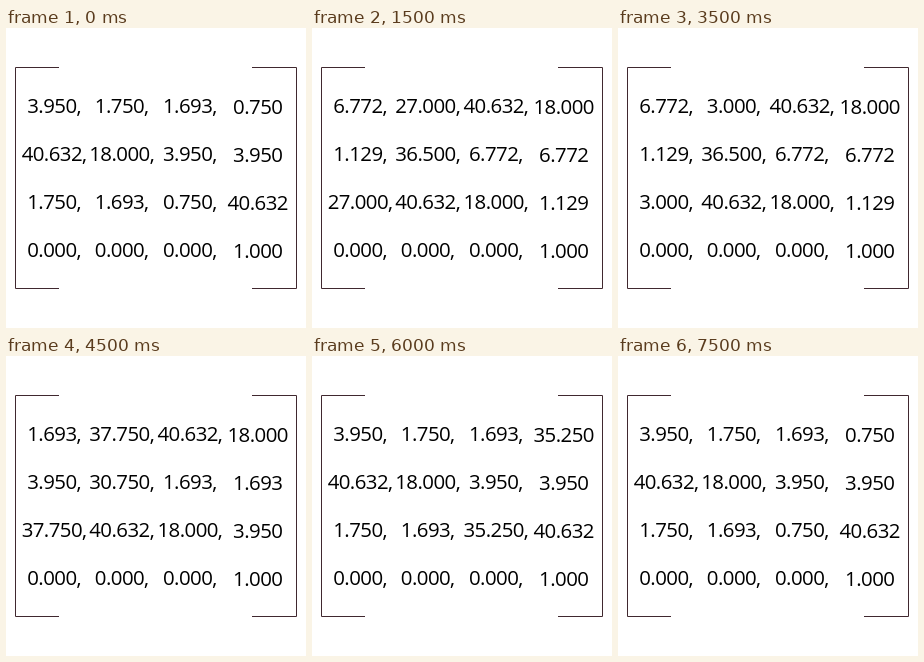
Animation, 300 px wide and 300 px high, one loop 8 s. Source, as an HTML page:

```html
<!DOCTYPE html>
<html lang="en">
<head>
<meta charset="utf-8">
<title>Matrix</title>
<style>
  html, body { margin: 0; width: 100%; height: 100%; overflow: hidden; background: #fff; }
  svg { display: block; width: 100%; height: 100%; }
  text {
    font: 20.4px "Open Sans", "Noto Sans", sans-serif;
    letter-spacing: -0.55px;
    text-anchor: middle;
    fill: #000;
  }
  path { fill: none; stroke: #40282f; stroke-width: 1; }
</style>
</head>
<body>
<svg viewBox="0 0 300 300">
  <path d="M53 39.5H9.5V260.5H53M246 39.5H290.5V260.5H246"/>
  <g id="cells"></g>
</svg>
<script>
const STEP = 500;
const COLS = [48.1, 115.7, 183.9, 251.7];
const UNIT = 40.632 / 72;

// a, c and e count whole units; b, d and f are plain values
const state = (a, b, c, d, e, f) => ({ a: a * UNIT, b, c: c * UNIT, d, e: e * UNIT, f });
const home = (b, d) => state(7, b, 3, d, 72, 18);

const states = [home(1.75, 0.75)];
for (let b = 39; b >= 3; b -= 6) states.push(state(12, b, 72, 18, 2, 36.5));
for (const b of [1.75, 37.75]) states.push(state(3, b, 72, 18, 7, 30.75));
for (const d of [2.25, 33.75]) states.push(state(84, 21, 3, d, 7, 34.25));
states.push(home(1.75, 35.25), home(34.25, 35.25), home(34.25, 0.75), home(1.75, 0.75));

const layout = ({ a, b, c, d, e, f }) => [a, b, c, d, e, f, a, a, b, c, d, e, 0, 0, 0, 1];

const group = document.getElementById("cells");
const cells = Array.from({ length: 16 }, (_, i) => {
  const cell = document.createElementNS("http://www.w3.org/2000/svg", "text");
  const col = i % 4;
  cell.setAttribute("x", COLS[col]);
  cell.setAttribute("y", 85 + 48 * Math.floor(i / 4) + (col === 3 ? 1 : 0));
  return group.appendChild(cell);
});

let shown = -1;
function draw(time) {
  const index = Math.floor(time / STEP) % states.length;
  if (index !== shown) {
    shown = index;
    layout(states[index]).forEach((value, i) => {
      cells[i].textContent = value.toFixed(3) + (i % 4 < 3 ? "," : "");
    });
  }
}

function tick(now) {
  draw(now);
  requestAnimationFrame(tick);
}
draw(0);
requestAnimationFrame(tick);
</script>
</body>
</html>
```
